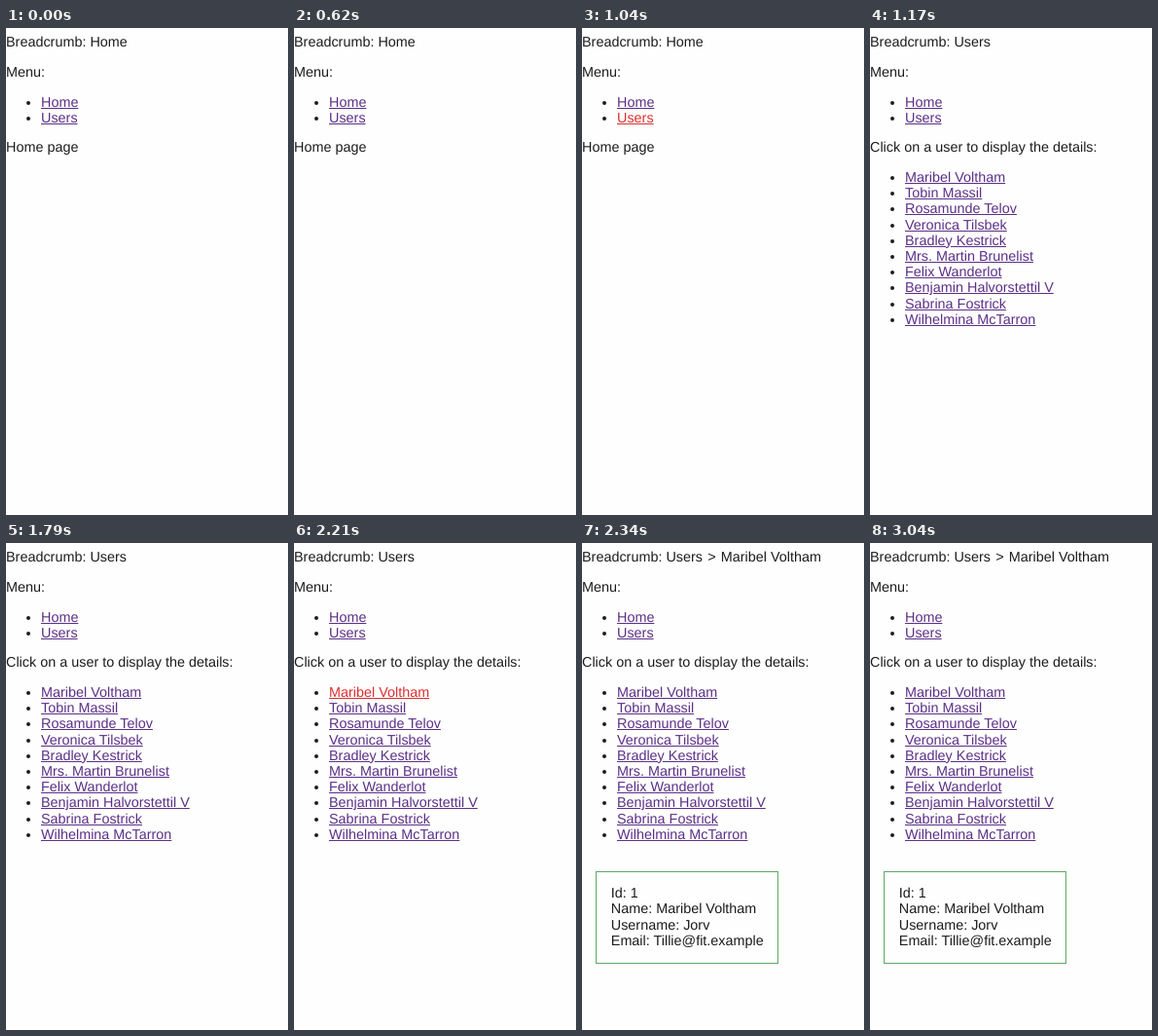
An HTML page that plays this animation: 290x500 px, repeating every 3.51 s.

```html
<!DOCTYPE html>
<html lang="en">
<head>
<meta charset="utf-8">
<title>Breadcrumb demo</title>
<style>
  html, body { margin: 0; width: 100%; height: 100%; overflow: hidden; background: #fefefe; }
  body {
    position: relative;
    color: #1c1c1c;
    font: 14.4px/16.2px "Liberation Sans", Arial, sans-serif;
    text-rendering: geometricPrecision;
    white-space: nowrap;
  }
  main { position: absolute; top: 7.35px; left: 0; }
  p { margin: 0 0 14.4px; }
  ul { margin: 0 0 14.4px; padding-left: 36px; }
  a { color: #5c3087; text-decoration: underline; }
  a.active { color: #dc3030; }
  i { font-style: normal; margin: 0 1.2px; }
  .card {
    box-sizing: border-box;
    width: 187.8px;
    margin: 28.8px 0 0 14.4px;
    padding: 14.4px;
    border: 1px solid #5ea866;
  }
  [hidden] { display: none; }
</style>
</head>
<body>
<main>
  <p>Breadcrumb: <span id="crumb"></span></p>
  <p>Menu:</p>
  <ul><li><a>Home</a></li><li><a id="usersLink">Users</a></li></ul>
  <p id="home">Home page</p>
  <section id="users">
    <p>Click on a user to display the details:</p>
    <ul id="list"></ul>
  </section>
  <div id="card" class="card">Id: 1<br>Name: Maribel Voltham<br>Username: Jorv<br>Email: Tillie@fit.example</div>
</main>
<script>
  const LOOP = 3510;
  const names = [
    "Maribel Voltham", "Tobin Massil", "Rosamunde Telov", "Veronica Tilsbek",
    "Bradley Kestrick", "Mrs. Martin Brunelist", "Felix Wanderlot",
    "Benjamin Halvorstettil V", "Sabrina Fostrick", "Wilhelmina McTarron"
  ];
  const $ = id => document.getElementById(id);
  $("list").innerHTML = names.map(name => `<li><a>${name}</a></li>`).join("");
  const firstUser = $("list").querySelector("a");

  // Each press lasts 130 ms, then the next view opens.
  function render(t) {
    const onUsers = t >= 1170, onDetails = t >= 2340;
    $("crumb").innerHTML = !onUsers ? "Home"
      : onDetails ? `Users <i>&gt;</i> ${names[0]}` : "Users";
    $("home").hidden = onUsers;
    $("users").hidden = !onUsers;
    $("card").hidden = !onDetails;
    $("usersLink").className = t >= 1040 && !onUsers ? "active" : "";
    firstUser.className = t >= 2210 && !onDetails ? "active" : "";
  }

  function tick() {
    render(performance.now() % LOOP);
    requestAnimationFrame(tick);
  }
  tick();
</script>
</body>
</html>
```
